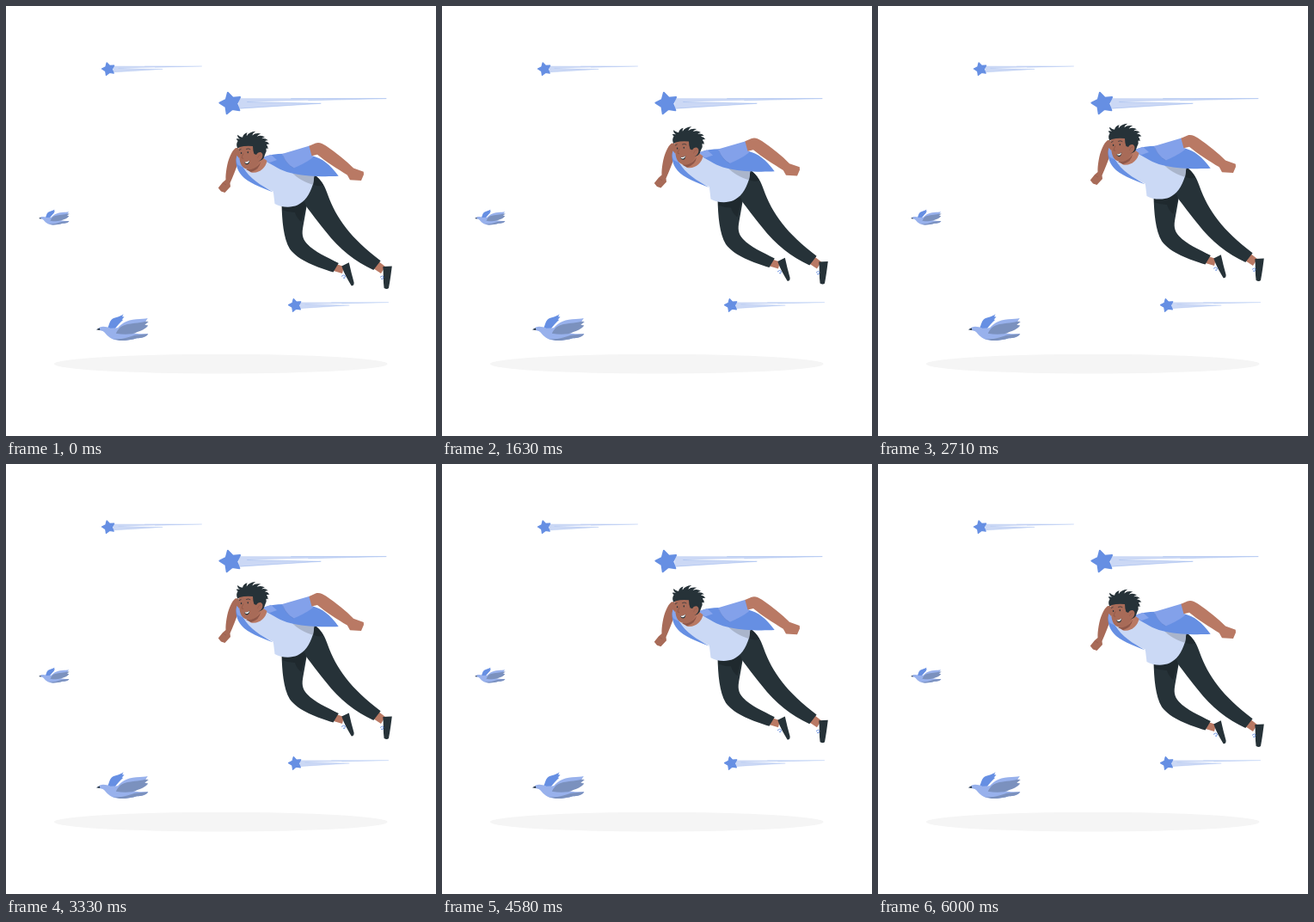
These frames come from a looping animation (500 by 500 pixels, 6040 ms). An HTML page:

```html
<!DOCTYPE html>
<html lang="en">
<head>
<meta charset="utf-8">
<title>Flying man</title>
<style>
  html, body { margin: 0; width: 100%; height: 100%; overflow: hidden; background: #fff; }
  svg { display: block; width: 100%; height: 100%; }
</style>
</head>
<body>
<svg viewBox="0 0 500 500" xmlns="http://www.w3.org/2000/svg">
  <defs>
    <g id="comet">
      <path fill="#cbd8f5" d="M9-6L181-5.6L19-1.7L105 .1L9 6.2Z"/>
      <path fill="none" stroke="#668fe3" stroke-width=".4" stroke-opacity=".7" d="M70-5.6L181-5.6L90-3.3M19-1.7L105 .1L11 6"/>
      <path id="star" fill="#668fe3" stroke="#668fe3" stroke-width="2" stroke-linejoin="round"/>
    </g>
    <g id="bird">
      <path fill="#668fe3" d="M13-2C15-6 15-10 18.5-12.5C22-14.5 28-15 31.3-18L29.8-15L32.2-14.6L29.3-11.5L31-11.4C27-8 24-4 20.5 0Z"/>
      <path fill="#98b1ec" d="M0 0L4-2.8C8-4.2 12-3 16-1.5L26-2C34 2 42 6 60 5C58 9 51 10 47 10C41 12 33 13 27 12.8C17 12 13 8 9 3C7 1 4 1 0 0Z"/>
      <path fill="#7b91be" d="M40 8C46 5.5 53 6 60 5C58 9 51 10 47 10C41 12 33 13 27 12.8L18 10.5C27 12 34 10 40 8Z"/>
      <path fill="#98b1ec" d="M22 2C27-7 35-11 46-12C52-12.4 56-12.5 59.5-13.3L56-8L34-1Z"/>
      <path fill="#7b91be" d="M22.5 4.5C25 0 27-3.5 32-5C40-8 49-7 57-9.5L60.5-9.2L56-5.4L60-4.8C56 0 52 1 47 3C41 6 31 6 22.5 4.5Z"/>
      <path fill="#263238" d="M-.3 .1L3.5-1.6L4 .9Z"/>
    </g>
  </defs>

  <ellipse cx="249.8" cy="416.2" rx="193.9" ry="11.3" fill="#f5f5f5"/>
  <use href="#comet" transform="translate(261.3 113.2)"/>
  <use href="#comet" transform="translate(119.2 73.4) scale(.6)"/>
  <use href="#comet" transform="translate(336.3 348) scale(.6)"/>
  <use href="#bird" transform="translate(105.3 376.2)"/>
  <use href="#bird" transform="translate(38.3 247) scale(.585)"/>

  <g id="man">
    <!-- far arm -->
    <path fill="#a86b58" d="M266.5 165.5C272 163 274 171 271 179C268 188 264 198 260.5 206L261 210L254.5 217L250 215.5L246.8 211.5L251.8 205.2L255.5 202C255.2 195 257 182 260.8 174C262.5 170 264.5 167 266.5 165.5Z"/>
    <path fill="none" stroke="#8e5749" stroke-width=".5" d="M252.5 206L256 208"/>

    <!-- ankles and shoes -->
    <path fill="#b97964" d="M384 300L393 303L391 311L381 308ZM432 296L441 303L436 311L427 305Z"/>
    <path fill="#263238" d="M390.3 302.5L398.8 298.3C400.5 306 402.5 314 404.6 321.5Q404.8 325.8 401.6 325.2C398 319 393 311 390.3 302.5ZM438.3 303L448.8 302.5C447.7 311 446.6 320 445 328Q443 330 439.6 328C438.4 320 439.2 311 438.3 303Z"/>
    <path fill="none" stroke="#668fe3" stroke-width=".9" d="M390 314.5Q393 311.5 394.5 314Q394 318 392 316M435 315.5Q438 312.5 439 315Q438.5 319 436 317"/>

    <!-- trousers -->
    <path fill="#263238" d="M320.5 230C321 249 322.5 270 330 282.5C340 296 362 304 380.5 309.5L386.8 299C373 292 359 286 350 276.5C344 270 344 264 345.5 256L351 225Z"/>
    <path fill="#1f292e" d="M321 230L350 228L343.5 251Q338 247 336 240Q328 240 321 237Z"/>
    <path fill="#263238" d="M358 196C367 202 371 210 374 219C384 247 401 270 435.6 296.2L427.3 307C406 297 388 283 372 262.5C362 250 355 241 348.5 232L345 218Z"/>
    <path fill="#1f292e" d="M358 196Q365 201 369 208Q364 211 356 207Z"/>

    <!-- shirt -->
    <path fill="#cbd9f5" d="M274 188C285 191 295 188 303 179L333 187L358.5 196L357 207C353 220 347 227.5 339 231.5C331 235 319 234 312.5 230L310.8 215.5C296 210 283 202 274 188Z"/>
    <path fill="#aab5cb" d="M331 192L358.5 197L357 208C348 205 339 201 331 192Z"/>

    <!-- jacket -->
    <path fill="#668fe3" d="M268.5 174C266 181 268 190 274 197C281 205 296 211 311 216.5C296 208.5 283 200 276 188Z"/>
    <path fill="#87a5ec" d="M268.5 174C267 179 268 183 270 185L276 188L272 178Z"/>
    <path fill="#668fe3" d="M299 176C306 173 314 172 323 171.8L357 174.5C367 177 377 184 386.7 197.8C372 198.5 350 198.5 335 195C323 193 315 188 303 181Z"/>
    <path fill="#87a5ec" d="M299 176L308 172.7L315 179L306.5 182L303 181Z"/>
    <path fill="#83a1ea" d="M321 172L353 162.6C354 167 356 171 357 176C349 182 341 186 334.5 188.5C328 185 323 179 321 172Z"/>
    <path fill="none" stroke="#5478c4" stroke-width=".4" d="M322 174Q326 184 334.5 188.5"/>

    <!-- near arm -->
    <path fill="#b97964" d="M352.4 162.8L360 159.5C364 158 368 160 372 162.5C384 170.5 395 179.5 404 188.6L415.8 192.8L416 196L413 203L400 202.2L396.8 196.4C385 189.3 372 181 362 172.8L355.5 174.3Z"/>

    <!-- neck and head -->
    <path fill="#b97964" d="M282 188L298 176L303.5 180C302 188 295 195 285 193.5L280 190Z"/>
    <path fill="#8e5749" d="M279 190L287 189Q293 187 296 181Q295 190 285 193Z"/>
    <path fill="#a86b58" d="M270.3 163C271 172 270.8 180 274 185.5Q278 191 285 190C292 188 296 181 298 173L293 158L276 158Z"/>
    <path fill="#263238" d="M269.3 165.5C267.5 162 268 159 269.6 157L267.6 154.6Q270 154 272 154.7Q268.5 152.5 269.3 149.8Q272 152.6 275 152.7Q276 148.5 280.6 147.2Q279.3 149.5 279.8 151.3Q282.5 146.4 290.2 145.8Q286.8 147.8 286.3 150.4Q290 147.3 296.2 148.4Q292.8 149.6 291.7 151.7Q296.5 149.6 301 152.4Q298.3 152.8 297.3 154.3Q301.5 153.2 304.8 156.2Q302.3 156 301 157.2Q304.5 157.6 306.4 160.6Q304 160.4 302.8 161.2Q304.8 163 304.8 166.2Q303.6 165.3 302.5 165.8Q303.6 169.3 301.2 172.6L299.6 177Q297.5 180 293.8 180.5L294 174L288.5 172Q287 168 287 163Q279 162 271.8 164Z"/>
    <path fill="#a86b58" d="M290.5 180C289 174 292 169.5 296 170C300 171 299 178 294 180.5Z"/>
    <path fill="none" stroke="#8e5749" stroke-width=".5" d="M292.5 177Q293 173 296.5 172.8"/>
    <path fill="none" stroke="#263238" stroke-width=".7" stroke-linecap="round" d="M271.3 167.5L273.2 166.4M279.5 166.3Q282 165 284 166.5"/>
    <g fill="#263238"><ellipse cx="273.6" cy="171" rx=".7" ry="1.1"/><ellipse cx="281.3" cy="170.2" rx=".7" ry="1.1"/></g>
    <path fill="none" stroke="#87503f" stroke-width=".6" d="M276 171.5Q274 175.5 274 176.8L276.2 177.3"/>
    <path fill="#263238" d="M277 181.4Q280.5 181.8 283.2 179.4Q283.2 184 280.2 184.3Q278 184 277 181.4Z"/>
    <path fill="#fff" d="M277.3 181.4Q280.5 181.8 283 179.6Q282.8 182.1 280.5 182.9Q278.3 182.9 277.3 181.4Z"/>
  </g>
</svg>
<script>
  const LOOP = 6040, CYCLE = 6000, RISE = 10;
  const man = document.getElementById('man');

  const starPoints = Array.from({ length: 10 }, (_, i) => {
    const radius = i % 2 ? 7 : 12.9;
    const angle = Math.PI * (1.015 + i / 5);
    return `${(radius * Math.cos(angle)).toFixed(2)} ${(radius * Math.sin(angle)).toFixed(2)}`;
  });
  document.getElementById('star').setAttribute('d', `M${starPoints.join('L')}Z`);

  // Linear rise and fall with a short rest at the bottom.
  function draw(ms) {
    const t = Math.min(ms % LOOP, CYCLE);
    const lift = RISE * (1 - Math.abs(2 * t / CYCLE - 1));
    man.setAttribute('transform', `translate(0 ${-lift})`);
  }

  const start = performance.now();
  function tick() {
    draw(performance.now() - start);
    requestAnimationFrame(tick);
  }
  tick();
</script>
</body>
</html>
```
